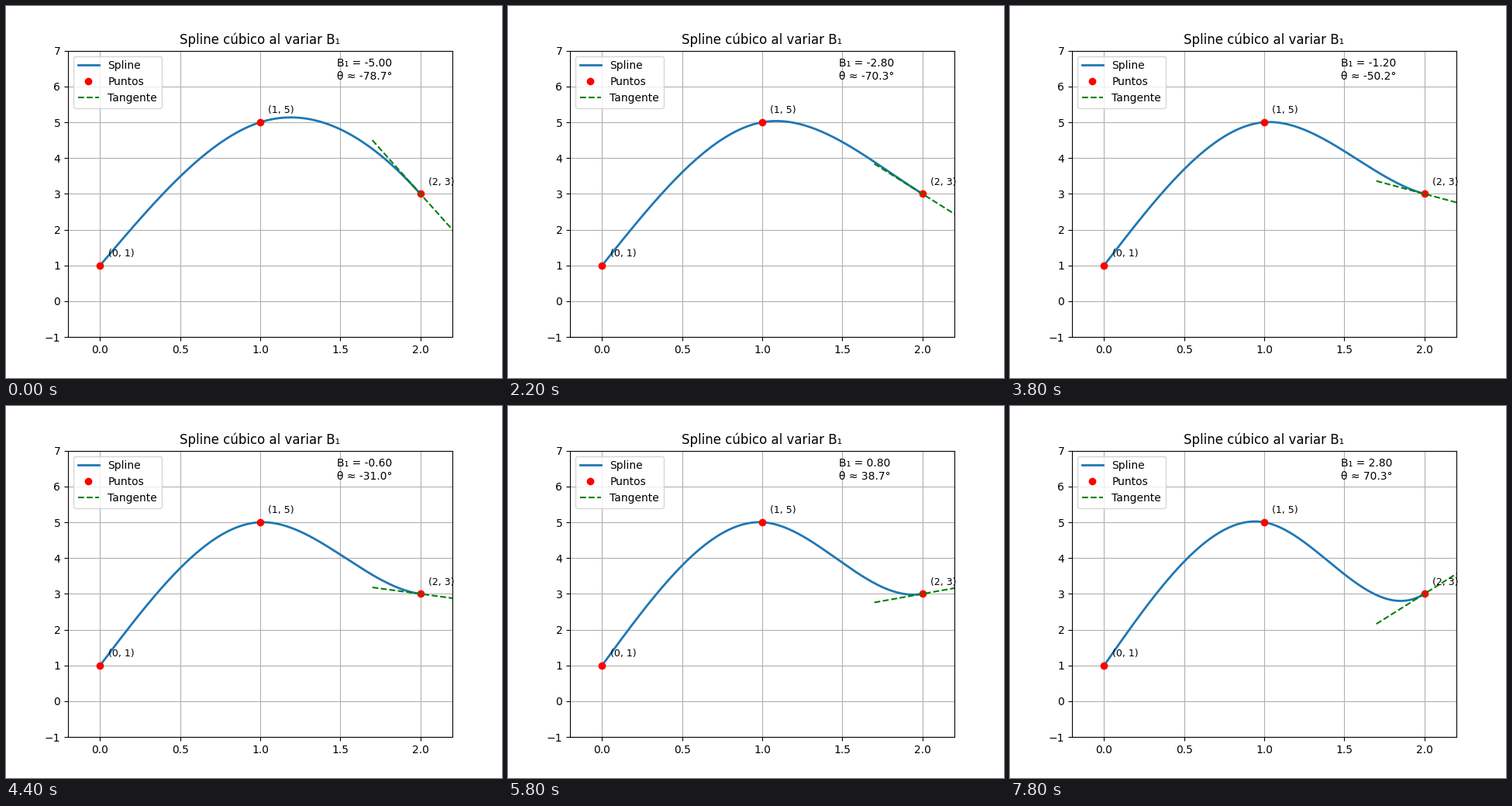
Recreate the animation shown at these times as a matplotlib script. Size 640 by 480 pixels, loop 8 s.

```python
import numpy as np
import matplotlib.pyplot as plt
from matplotlib.animation import FuncAnimation

FRAMES = 40
INTERVAL = 200
KNOTS_X = np.array([0.0, 1.0, 2.0])
KNOTS_Y = np.array([1.0, 5.0, 3.0])
xs = np.linspace(0, 2, 401)
tangent_x = np.array([1.7, 2.3])


def hermite(t, y0, y1, m0, m1):
    """Cubic on [0, 1] with the given end values and slopes."""
    c = 3 * (y1 - y0) - 2 * m0 - m1
    d = 2 * (y0 - y1) + m0 + m1
    return y0 + t * (m0 + t * (c + t * d))


def spline(x, end_slope):
    """Cubic spline, natural at the left end and clamped at the right."""
    y0, y1, y2 = KNOTS_Y
    mid = (3 * (y2 - y0) - 1.5 * (y1 - y0) - end_slope) / 3.5
    start = (3 * (y1 - y0) - mid) / 2
    return np.where(x <= 1,
                    hermite(x, y0, y1, start, mid),
                    hermite(x - 1, y1, y2, mid, end_slope))


fig, ax = plt.subplots(figsize=(6.4, 4.8), dpi=100)
curve, = ax.plot([], [], lw=2, label="Spline")
ax.plot(KNOTS_X, KNOTS_Y, "ro", label="Puntos")
tangent, = ax.plot([], [], "g--", label="Tangente")
info = ax.text(0.7, 0.9, "", transform=ax.transAxes)

for px, py in zip(KNOTS_X, KNOTS_Y):
    ax.text(px + 0.05, py + 0.25, f"({px:.0f}, {py:.0f})", fontsize=9)

ax.set_xlim(-0.2, 2.2)
ax.set_ylim(-1, 7)
ax.set_title("Spline cúbico al variar B₁")
ax.grid(True)
ax.legend(loc="upper left")


def update(i):
    slope = (i - 25) / 5
    angle = np.degrees(np.arctan(slope))
    curve.set_data(xs, spline(xs, slope))
    tangent.set_data(tangent_x, KNOTS_Y[-1] + slope * (tangent_x - KNOTS_X[-1]))
    info.set_text(f"B₁ = {slope:.2f}\nθ ≈ {angle:.1f}°")
    return curve, tangent, info


anim = FuncAnimation(fig, update, frames=FRAMES, interval=INTERVAL,
                     repeat=True, repeat_delay=0)
plt.show()
```
